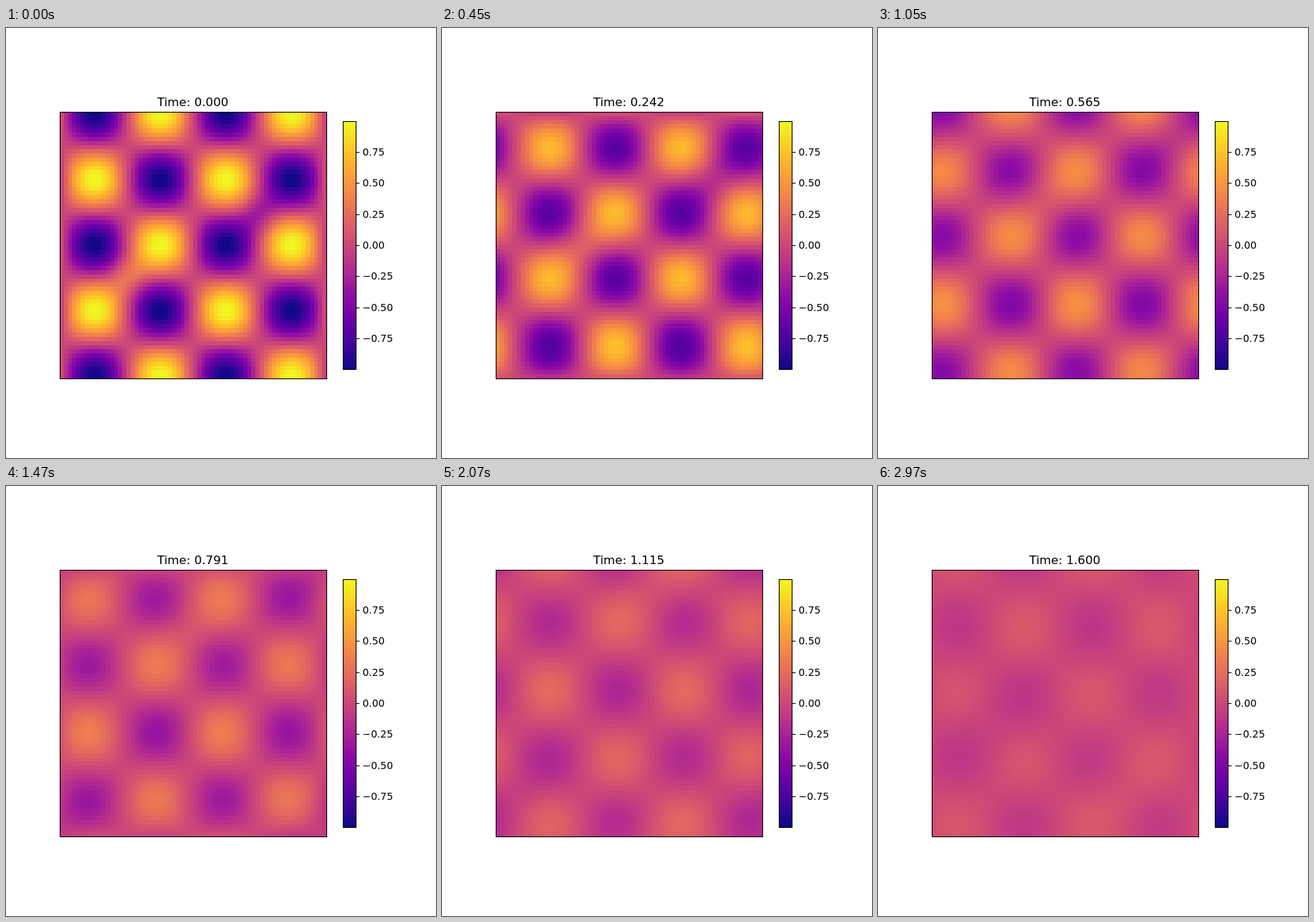
An HTML page with a canvas for the animation above (3 s loop, 600 by 600 pixels).

```html
<!DOCTYPE html>
<html lang="en">
<head>
<meta charset="utf-8">
<title>Vorticity field</title>
<style>
html, body { margin: 0; width: 100%; height: 100%; overflow: hidden; background: #fff; }
canvas { display: block; }
</style>
</head>
<body>
<canvas id="stage" width="600" height="600"></canvas>
<script>
const N = 64, PERIOD = N - 1, FRAMES = 100, FRAME_MS = 30, T_END = 1.6;
const DRIFT_X = 0.3 * PERIOD, DRIFT_Y = 0.5 * PERIOD;   // cells per time unit
const VISCOSITY = 0.0045 * PERIOD * PERIOD;
const SUBSTEPS = 2, DT = T_END / (FRAMES - 1) / SUBSTEPS;
const PLASMA = ['0d0887', '41049d', '6a00a8', '8f0da4', 'b12a90', 'cc4778',
                'e16462', 'f2844b', 'fca636', 'fcce25', 'f0f921'];
const RGB = PLASMA.map(hex => [0, 2, 4].map(i => parseInt(hex.slice(i, i + 2), 16)));

const at = (i, j) => (j & 63) * N + (i & 63);

function eachCell(visit) {
  for (let j = 0; j < N; j++) for (let i = 0; i < N; i++) visit(at(i, j), i, j);
}

function startField() {
  const w = new Float64Array(N * N), k = 4 * Math.PI / PERIOD;
  const blob = (i, j, x, y) =>
    0.3 * Math.exp(-((i / PERIOD - x) ** 2 + (j / PERIOD - y) ** 2) / 0.005);
  eachCell((c, i, j) => {
    w[c] = -Math.sin(k * i) * Math.cos(k * j)
      + blob(i, j, 0.25, 0.38) - blob(i, j, 0.75, 0.62);
  });
  return w;
}

// Over-relaxation sweeps for laplacian(psi) = -w
function relax(psi, w, sweeps) {
  while (sweeps--) eachCell((c, i, j) => {
    const sum = psi[at(i + 1, j)] + psi[at(i - 1, j)] + psi[at(i, j + 1)] + psi[at(i, j - 1)];
    psi[c] += 1.85 * ((sum + w[c]) / 4 - psi[c]);
  });
}

// Viscous vorticity flow, seen from the drifting frame
function simulate() {
  let w = startField();
  const psi = w.map(v => v / 0.0795), fields = [w];
  relax(psi, w, 60);
  for (let n = 1; n < FRAMES; n++) {
    for (let s = 0; s < SUBSTEPS; s++) {
      relax(psi, w, 12);
      const next = new Float64Array(N * N);
      eachCell((c, i, j) => {
        const e = at(i + 1, j), l = at(i - 1, j), u = at(i, j + 1), d = at(i, j - 1);
        const advect = ((psi[u] - psi[d]) * (w[e] - w[l]) - (psi[e] - psi[l]) * (w[u] - w[d])) / 4;
        const spread = w[e] + w[l] + w[u] + w[d] - 4 * w[c];
        next[c] = w[c] + DT * (VISCOSITY * spread - advect);
      });
      w = next;
    }
    fields.push(w);
  }
  return fields;
}

function sample(w, x, y) {
  const i = Math.floor(x), j = Math.floor(y), a = x - i, b = y - j;
  return (w[at(i, j)] * (1 - a) + w[at(i + 1, j)] * a) * (1 - b)
    + (w[at(i, j + 1)] * (1 - a) + w[at(i + 1, j + 1)] * a) * b;
}

const ctx = document.getElementById('stage').getContext('2d');
const grid = document.createElement('canvas');
grid.width = grid.height = N;
const gridCtx = grid.getContext('2d'), pixels = gridCtx.createImageData(N, N);
const fields = simulate();

function paintField(n, t) {
  eachCell((c, i, j) => {
    const v = sample(fields[n], i - DRIFT_X * t, j - DRIFT_Y * t);
    const p = Math.min(9.9999, Math.max(0, (v + 1) * 5)), s = Math.floor(p);
    const o = 4 * at(i, N - 1 - j);
    for (let ch = 0; ch < 3; ch++)
      pixels.data[o + ch] = RGB[s][ch] + (RGB[s + 1][ch] - RGB[s][ch]) * (p - s);
    pixels.data[o + 3] = 255;
  });
  gridCtx.putImageData(pixels, 0, 0);
  ctx.imageSmoothingEnabled = false;
  ctx.drawImage(grid, 75, 117, 372, 372);
}

function paintColorbar() {
  const ramp = ctx.createLinearGradient(0, 476.25, 0, 129.75);
  PLASMA.forEach((hex, i) => ramp.addColorStop(i / 10, '#' + hex));
  ctx.fillStyle = ramp;
  ctx.fillRect(470.5, 130.5, 18, 346);
  ctx.strokeRect(470.5, 130.5, 18, 346);
  ctx.fillStyle = '#000';
  ctx.font = '13.89px "DejaVu Sans", sans-serif';
  ctx.textAlign = 'left';
  for (let v = -0.75; v <= 0.75; v += 0.25) {
    const y = Math.round(303 - v * 173.3);
    ctx.beginPath();
    ctx.moveTo(488.5, y + 0.5);
    ctx.lineTo(493.4, y + 0.5);
    ctx.stroke();
    ctx.fillText((v < 0 ? '\u2212' : '') + Math.abs(v).toFixed(2), 497.5, y + 5);
  }
}

function draw(now) {
  const n = Math.floor(now % (FRAMES * FRAME_MS) / FRAME_MS);
  const t = n * T_END / (FRAMES - 1);
  ctx.fillStyle = '#fff';
  ctx.fillRect(0, 0, 600, 600);
  ctx.strokeStyle = '#000';
  ctx.lineWidth = 1.11;
  paintField(n, t);
  ctx.strokeRect(75.5, 117.5, 372, 372);
  paintColorbar();
  ctx.font = '16.67px "DejaVu Sans", sans-serif';
  ctx.textAlign = 'center';
  ctx.fillText('Time: ' + (Math.floor(t * 1000 + 1e-6) / 1000).toFixed(3), 260.7, 109);
  requestAnimationFrame(draw);
}
requestAnimationFrame(draw);
</script>
</body>
</html>
```
